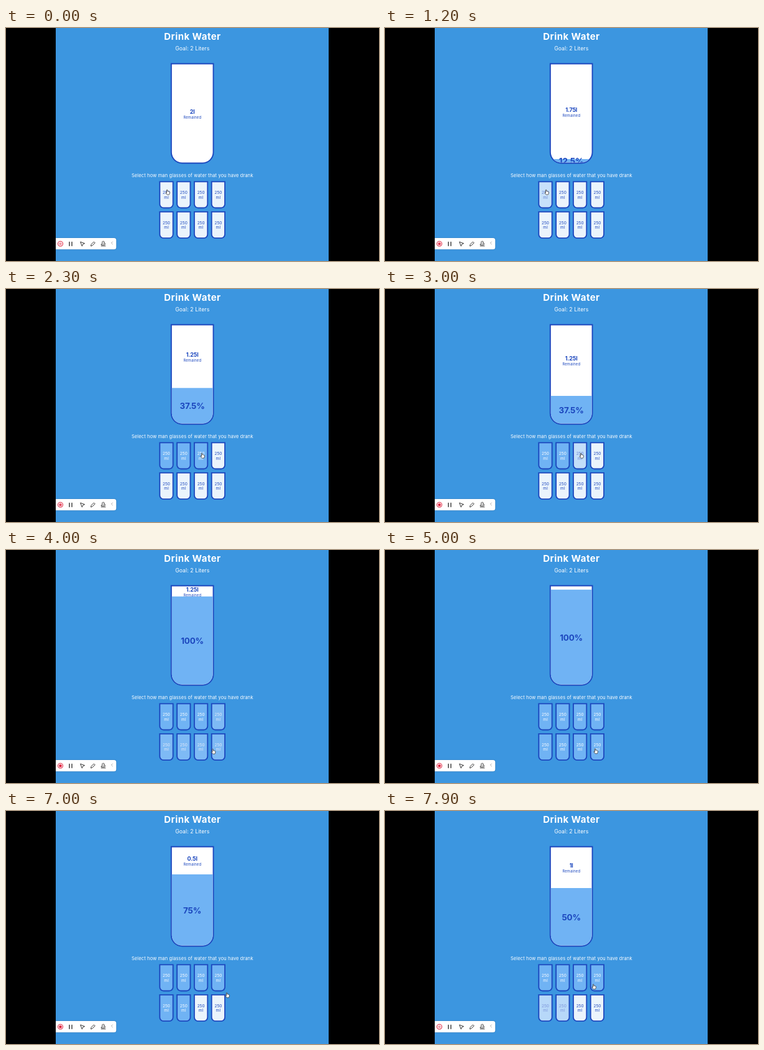
Recreate the animation shown at these times as an HTML page with a canvas. Size 600 px wide and 375 px high, loop 8000 ms.

```html
<!DOCTYPE html>
<html lang="en">
<head>
<meta charset="utf-8">
<title>Drink Water</title>
<style>
  html, body { margin: 0; width: 100%; height: 100%; overflow: hidden; background: #000; }
  canvas { display: block; width: 600px; height: 375px; }
</style>
</head>
<body>
<canvas id="stage"></canvas>
<script>
const LOOP = 8000, STEP = 100, TRANSITION = 300;
const CENTER = 299.7, CUP_TOP = 58.4, CUP_BOTTOM = 216.6, FULL_HEIGHT = 152.8;
const BLUE = [28, 71, 190], WHITE = [255, 255, 255], EMPTY = [235, 244, 252], WATER = [112, 179, 244];

// [time, glasses filled after the click]
const CLICKS = [[-1000, 0], [1140, 1], [1470, 3], [2350, 2], [2935, 3],
                [3820, 8], [5200, 7], [6560, 6], [7800, 4]];
// [time, x, y]
const POINTER = [[0, 260, 264], [1200, 260, 264], [1450, 316, 268], [3300, 316, 268],
                 [3780, 333.5, 324], [4700, 333.5, 324], [4900, 339, 323.5], [5450, 339, 323.5],
                 [6150, 293, 321.5], [6650, 293, 321.5], [6900, 363, 300], [7200, 336, 285],
                 [7400, 336, 285], [7700, 336, 282.5], [LOOP, 336, 282.5]];

const canvas = document.getElementById('stage');
const ctx = canvas.getContext('2d');
const ratio = window.devicePixelRatio || 1;
canvas.width = 600 * ratio;
canvas.height = 375 * ratio;
ctx.scale(ratio, ratio);

const lerp = (a, b, p) => a + (b - a) * p;
const rgb = c => `rgb(${c.map(Math.round).join(',')})`;
const mix = (a, b, p) => rgb(a.map((v, i) => lerp(v, b[i], p)));

// cubic-bezier(.25, .1, .25, 1)
function ease(x) {
  if (x >= 1) return 1;
  let low = 0, high = 1, s = 0.5;
  for (let i = 0; i < 20; i++) {
    if (0.75 * s * (1 - s) + s ** 3 < x) low = s; else high = s;
    s = (low + high) / 2;
  }
  return 0.3 * s * (1 - s) ** 2 + 3 * s * s * (1 - s) + s ** 3;
}

function text(str, x, y, size, weight, color, spacing = 0) {
  ctx.font = `${weight} ${size}px Inter, sans-serif`;
  ctx.letterSpacing = `${spacing * size}px`;
  ctx.textAlign = 'center';
  ctx.fillStyle = color;
  ctx.fillText(str, x + spacing * size / 2, y);
}

function box(x, y, w, h, radii, fill) {
  ctx.beginPath();
  ctx.roundRect(x, y, w, h, radii);
  ctx.fillStyle = fill;
  ctx.fill();
}

function line(d, color = '#222', width = 0.9, fill) {
  const path = new Path2D(d);
  if (fill) { ctx.fillStyle = fill; ctx.fill(path); }
  ctx.strokeStyle = color;
  ctx.lineWidth = width;
  ctx.lineJoin = ctx.lineCap = 'round';
  ctx.stroke(path);
}

function drawBigCup(count, level, label, showLabel) {
  const top = CUP_BOTTOM - level / 8 * FULL_HEIGHT;
  box(CENTER - 34.8, CUP_TOP - 1.9, 69.6, 162, [0, 0, 18.5, 18.5], rgb(BLUE));
  ctx.save();
  box(CENTER - 32.9, CUP_TOP, 65.8, CUP_BOTTOM - CUP_TOP, [0, 0, 16.6, 16.6], '#fff');
  ctx.clip();
  if (showLabel) {
    const middle = (CUP_TOP + top) / 2;
    text(label, CENTER, middle + 0.1, 9, 700, rgb(BLUE), -0.02);
    text('Remained', CENTER, middle + 8, 5.8, 400, rgb(BLUE), 0.035);
  }
  ctx.fillStyle = rgb(WATER);
  ctx.fillRect(CENTER - 34, top, 68, CUP_BOTTOM - top);
  if (count) text(`${count * 12.5}%`, CENTER, (top + CUP_BOTTOM) / 2 + 5.3, 13.4, 700, rgb(BLUE), -0.015);
  ctx.restore();
}

function drawGlass(index, fill) {
  const x = 258 + index % 4 * 27.8, y = 246.4 + (index >> 2) * 48.6;
  const ink = mix(BLUE, WHITE, fill);
  box(x - 11.6, y, 23.2, 44, [0, 0, 7, 7], rgb(BLUE));
  box(x - 9.75, y + 1.85, 19.5, 40.3, [0, 0, 5.2, 5.2], mix(EMPTY, WATER, fill));
  text('250', x, y + 20.5, 6.5, 400, ink);
  text('ml', x, y + 28.4, 6.5, 400, ink, 0.05);
}

function drawToolbar(t) {
  ctx.save();
  ctx.beginPath();
  ctx.rect(80, 330, 110, 40);
  ctx.clip();
  ctx.shadowColor = 'rgba(0,0,0,.25)';
  ctx.shadowBlur = 2 * ratio;
  box(74, 338, 103.3, 18.3, 3.5, '#fff');
  ctx.restore();

  ctx.globalAlpha = t ? 1 - 0.65 * (t % 1000) / 1000 : 0.45;
  box(85.4, 345.2, 4.2, 4.2, 1, '#e0243f');
  ctx.globalAlpha = 1;
  line('M83.5 347.3a4 4 0 1 0 8 0a4 4 0 1 0 -8 0', '#e0304a', 1.1);

  line('M102 344.5v6M106 344.5v6', '#222', 1.3);
  line('M120 344.3l6.6 2.4l-2.9 1.2l-1.2 2.9z');
  line('M136.6 350.6l.5-2.3l4.3-4.3l1.8 1.8l-4.3 4.3z');
  line('M153.2 350.8h6.8M153.6 349l5.2-.1l1-1.6l-2.4-1l.9-1.6a2 2 0 0 0-3.6-.5q-.4 1.3.8 2.2l-2 1.3z');
  line('M171.4 344l-2 2l2 2', '#888', 0.7);
}

function drawPointer(t) {
  const i = POINTER.findIndex(p => p[0] > t);
  const [t0, x0, y0] = POINTER[i - 1], [t1, x1, y1] = POINTER[i];
  const s = (t - t0) / (t1 - t0), p = s * s * (3 - 2 * s);
  ctx.save();
  ctx.translate(lerp(x0, x1, p), lerp(y0, y1, p));
  line('M-1.6 1V-3.3q.7-1.1 1.4 0V-1q.7-.6 1.3.1q.7-.5 1.2.2q.8-.2 1 .6V2L2.4 4.2H-.8L-3.2 1.2q.2-1.2 1.6-.2z',
       '#222', 0.7, '#fff');
  ctx.restore();
}

function draw(elapsed) {
  let t = Math.floor(elapsed % LOOP / STEP) * STEP;
  if (t < 1200) t = 0;
  if (t > 4400 && t < 4700) t = 4400;

  const at = CLICKS.findLastIndex(c => c[0] <= t);
  const [time, count] = CLICKS[at];
  const before = at ? CLICKS[at - 1][1] : 0;
  const p = ease((t - time) / TRANSITION);
  // A full cup keeps the previous label until its transition ends.
  const label = `${2 - (count === 8 ? before : count) / 4}l`;

  ctx.fillStyle = '#000';
  ctx.fillRect(0, 0, 600, 375);
  ctx.fillStyle = '#3c96e0';
  ctx.fillRect(80, 0, 439, 375);
  text('Drink Water', CENTER, 19.2, 15, 700, '#fff', 0.03);
  text('Goal: 2 Liters', CENTER, 35.7, 8.66, 400, '#fff', 0.01);
  text('Select how man glasses of water that you have drank', CENTER, 239.8, 7.41, 400, '#fff', 0.024);

  drawBigCup(count, lerp(before, count, p), label, count < 8 || p < 1);
  for (let i = 0; i < 8; i++) drawGlass(i, lerp(+(before > i), +(count > i), p));
  drawToolbar(t);
  drawPointer(t);
}

const start = performance.now();
function tick() {
  draw(performance.now() - start);
  requestAnimationFrame(tick);
}
tick();
</script>
</body>
</html>
```
